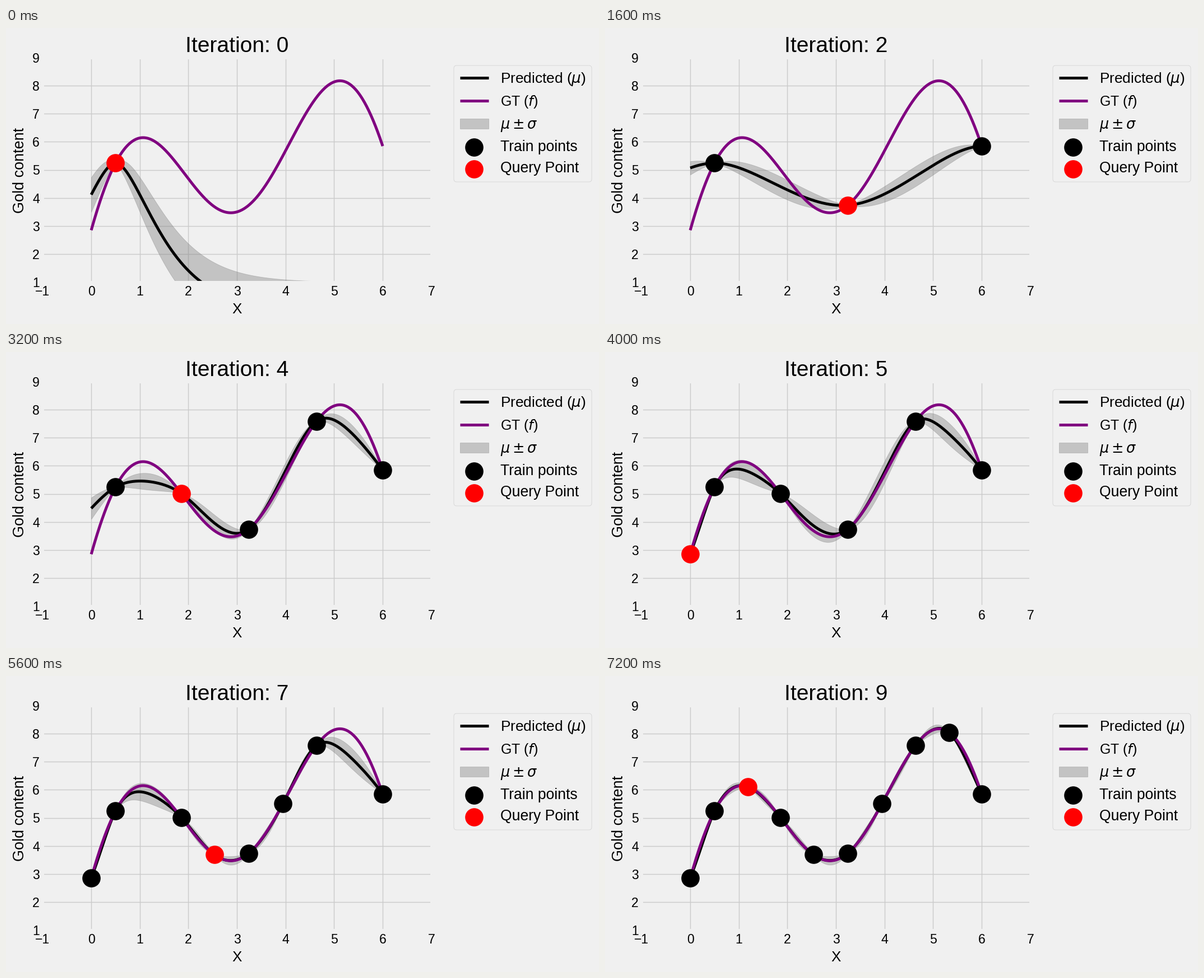
These frames come from a looping animation (1058 by 529 pixels, 8 s). A matplotlib script:

```python
import matplotlib.pyplot as plt
import numpy as np
from matplotlib.animation import FuncAnimation
from matplotlib.patches import FancyBboxPatch, Rectangle

W, H, DPI = 1058, 529, 64
LEFT, RIGHT, TOP, BOTTOM = 65.4, 758.8, 53.1, 453.9
BG, GRID = "#f0f0f0", "#cbcbcb"
QUERIES = np.array([0.5, 6, 3.242, 4.638, 1.855, 0, 3.946, 2.536, 5.333, 1.182])
XS = np.linspace(0, 6, 400)

plt.rcParams.update({
    "font.family": "Liberation Sans",
    "lines.solid_capstyle": "butt",
})


def px(n):
    """Convert pixels to points."""
    return n * 72 / DPI


def gold(x):
    return 2 + 0.5 * x + 2 * (x - 3) * np.sin(x - 3)


def matern(a, b, length):
    s = np.sqrt(3) * np.abs(a[:, None] - b[None, :]) / length
    return (1 + s) * np.exp(-s)


def gram(x, length):
    return matern(x, x, length) + 1e-10 * np.eye(len(x))


def log_likelihood(x, y, length):
    k = gram(x, length)
    return -0.5 * y @ np.linalg.solve(k, y) - 0.5 * np.linalg.slogdet(k)[1]


def fit_length(x, y):
    if len(x) == 1:
        return 1.0
    lengths = np.geomspace(0.2, 60, 500)
    return max(lengths, key=lambda s: log_likelihood(x, y, s))


def predict(x):
    """Posterior mean and deviation of the Gaussian process on XS."""
    y = gold(x)
    length = fit_length(x, y)
    cross = matern(XS, x, length)
    solved = np.linalg.solve(gram(x, length), cross.T)
    var = 1 - np.sum(cross * solved.T, axis=1)
    return y @ solved, np.sqrt(np.clip(var, 0, None))


fig = plt.figure(figsize=(W / DPI, H / DPI), dpi=DPI, facecolor=BG)

ax = fig.add_axes([LEFT / W, 1 - BOTTOM / H, (RIGHT - LEFT) / W, (BOTTOM - TOP) / H],
                  facecolor=BG)
ax.set(xlim=(-1, 7), ylim=(1, 9), xticks=range(-1, 8), yticks=range(1, 10))
ax.set_axisbelow(True)
ax.grid(color=GRID, lw=px(1.45))
ax.tick_params(length=0, labelbottom=False, labelleft=False)
for spine in ax.spines.values():
    spine.set(color=BG, linewidth=px(5))

# Overlay in pixel coordinates for labels and legend
page = fig.add_axes([0, 0, 1, 1])
page.set(xlim=(0, W), ylim=(H, 0))
page.axis("off")


def label(x, y, s, size, ha="center", **kw):
    return page.text(x, y, s, fontsize=px(size), ha=ha, va="baseline", color="black", **kw)


def dots(axes, color, x=(), y=(), z=3):
    return axes.scatter(x, y, s=px(32.6) ** 2, c=color, linewidths=0, zorder=z)


for v in range(-1, 8):
    label(LEFT + (v + 1) * (RIGHT - LEFT) / 8, 478.5, str(v).replace("-", "\u2212"), 23)
for v in range(1, 10):
    label(60, BOTTOM - (v - 1) * (BOTTOM - TOP) / 8 + 9, str(v), 23, ha="right")
label(412.3, 510.5, "X", 26)
label(32.5, 254.5, "Gold content", 27, rotation=90, rotation_mode="anchor")
title = label(412.3, 43, "", 39)

band_style = dict(color="gray", alpha=0.4, linewidth=px(0.83))
page.add_patch(FancyBboxPatch((803, 71), 238, 200, boxstyle="round,pad=4,rounding_size=5",
                              fc=BG, ec="#cccccc", lw=px(0.83), alpha=0.8))
page.plot([810, 861], [89, 89], color="black", lw=px(5))
page.plot([810, 861], [130, 130], color="purple", lw=px(5))
page.add_patch(Rectangle((810, 162), 51, 18, **band_style))
dots(page, "black", [835.3], [213])
dots(page, "red", [835.3], [252])
label(881.5, 98.5, r"Predicted ($\mu$)", 26.3, ha="left")
label(881.5, 139.5, r"GT ($f$)", 25, ha="left")
label(881.5, 180, r"$\mu \pm \sigma$", 25.5, ha="left")
label(881.5, 219.5, "Train points", 26.5, ha="left")
label(881.5, 258.5, "Query Point", 26.5, ha="left")

mean_line, = ax.plot([], [], color="black", lw=px(5))
ax.plot(XS, gold(XS), color="purple", lw=px(5))
train = dots(ax, "black", z=3)
query = dots(ax, "red", z=4)
bands = []


def draw(i):
    mean, dev = predict(QUERIES[:i + 1])
    points = np.column_stack([QUERIES, gold(QUERIES)])
    title.set_text(f"Iteration: {i}")
    mean_line.set_data(XS, mean)
    train.set_offsets(points[:i])
    query.set_offsets(points[i:i + 1])
    while bands:
        bands.pop().remove()
    bands.append(ax.fill_between(XS, mean - dev, mean + dev, zorder=1, **band_style))
    return title, mean_line, train, query, bands[0]


anim = FuncAnimation(fig, draw, frames=len(QUERIES), interval=800, repeat=True, blit=False)
plt.show()
```
